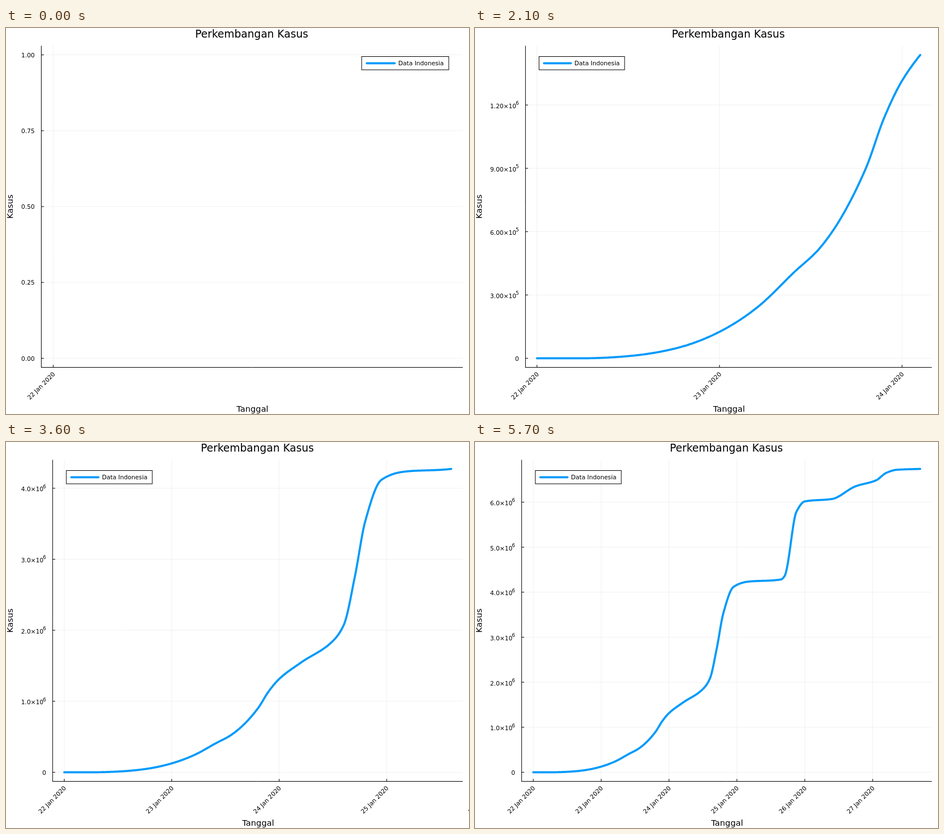
These frames come from a looping animation (820x683 px, 5800 ms). An HTML page with a canvas:

```html
<!DOCTYPE html>
<html lang="id">
<head>
<meta charset="utf-8">
<style>
html, body { margin: 0; width: 100%; height: 100%; overflow: hidden; background: #fff; }
canvas { display: block; }
</style>
</head>
<body>
<canvas id="stage" width="820" height="683"></canvas>
<script>
const ctx = document.getElementById('stage').getContext('2d');
const TOP = 31.5, BOTTOM = 600.5, RIGHT = 809, PAD = 0.03 / 1.06;
const STEP_DAYS = 20, FRAMES = 58, FRAME_MS = 100;
const TICK = 32 / 3, GUIDE = 44 / 3, TITLE = 56 / 3;
const BLUE = '#009afa', GRID = 'rgba(0,0,0,0.06)';

// Turning points of the curve: [day, cumulative cases in thousands].
const FIRST_DAY = 40;
const keys = [
  [FIRST_DAY, 0.002], [50, 0.034], [60, 0.514], [80, 3.842], [120, 20.16], [160, 56.39],
  [200, 125.4], [240, 236.5], [280, 400.5], [310, 522.6], [360, 896.6], [380, 1134.9],
  [400, 1314.6], [440, 1542.5], [500, 1850], [520, 2073], [540, 2726.8], [560, 3533],
  [590, 4117], [630, 4231], [730, 4283], [740, 4353], [775, 5780], [800, 6016],
  [880, 6070], [950, 6353], [1010, 6485], [1040, 6650], [1070, 6718], [1140, 6738.5]
];
// Growth is close to a power law, so the curve is smooth on log-log axes.
const logDay = d => Math.log(d - FIRST_DAY + 1);
const curve = monotoneCubic(keys.map(([d, k]) => [logDay(d), Math.log(k * 1000)]));
const daily = Array.from({ length: (FRAMES - 1) * STEP_DAYS + 1 },
  (_, d) => d < FIRST_DAY ? 0 : Math.exp(curve(logDay(d))));

function monotoneCubic(points) {
  const gap = i => points[i + 1][0] - points[i][0];
  const slope = i => (points[i + 1][1] - points[i][1]) / gap(i);
  const last = points.length - 1;
  const tangents = points.map((_, i) => {
    if (i === 0) return slope(0);
    if (i === last) return slope(last - 1);
    const g = gap(i - 1), h = gap(i);
    return 3 * (g + h) / ((2 * h + g) / slope(i - 1) + (h + 2 * g) / slope(i));
  });
  return x => {
    let i = 0;
    while (i < last - 1 && x >= points[i + 1][0]) i++;
    const h = gap(i), u = (x - points[i][0]) / h, w = 1 - u;
    return points[i][1] * w * w * (1 + 2 * u) + points[i + 1][1] * u * u * (3 - 2 * u)
      + h * u * w * (tangents[i] * w - tangents[i + 1] * u);
  };
}

// Picks the tick step with the best mix of count, coverage and roundness.
function yTicks(max) {
  const span = max * 1.06, power = Math.floor(Math.log10(max));
  let best = -1, ticks = [];
  for (const z of [power, power - 1]) {
    for (const [q, nice] of [[5, .9], [3, .2], [2.5, .5], [2, .7], [1, 1]]) {
      const step = q * 10 ** z, n = Math.floor(max * 1.03 / step) + 1;
      if (n < 4 || n >= 10) continue;
      const score = (1 - Math.abs(n - 5) / 5) / 4 + span / ((n - 1) * step) / 2 + nice / 4;
      if (score > best + 1e-9) {
        best = score;
        ticks = Array.from({ length: n }, (_, i) => +(i * step).toPrecision(6));
      }
    }
  }
  return ticks;
}

function yLabels(ticks) {
  const decimals = list => Math.max(...list.map(v => (String(+v.toFixed(6)).split('.')[1] || '').length));
  if (ticks[ticks.length - 1] <= 1e4) {
    const d = decimals(ticks);
    return ticks.map(v => ({ text: v.toFixed(d) }));
  }
  const exps = ticks.map(v => v ? Math.floor(Math.log10(v) + 1e-9) : 0);
  const mants = ticks.map((v, i) => v / 10 ** exps[i]);
  const d = decimals(mants) + 1;
  return mants.map((m, i) => m ? { text: m.toFixed(d) + '×10', exp: exps[i] } : { text: '0' });
}

function textWidth(str) {
  ctx.font = TICK + 'px "DejaVu Sans", sans-serif';
  return ctx.measureText(str).width;
}

function text(str, x, y, size, align = 'center', angle = 0) {
  ctx.font = size + 'px "DejaVu Sans", sans-serif';
  ctx.textAlign = align;
  ctx.fillStyle = '#000';
  ctx.save();
  ctx.translate(x, y);
  ctx.rotate(angle);
  ctx.fillText(str, 0, 0);
  ctx.restore();
}

function path(points, color = '#000', width = 1, cap = 'butt') {
  ctx.strokeStyle = color;
  ctx.lineWidth = width;
  ctx.lineCap = cap;
  ctx.lineJoin = 'round';
  ctx.beginPath();
  for (const [x, y] of points) ctx.lineTo(x, y);
  ctx.stroke();
}

function line(x1, y1, x2, y2, ...style) {
  path([[x1, y1], [x2, y2]], ...style);
}

function legend(left, onRight) {
  const w = RIGHT - left, label = 'Data Indonesia';
  const boxW = textWidth(label) + w * 0.0989;
  const x = onRight ? RIGHT - w / 30 - boxW : left + w / 30;
  ctx.fillStyle = '#fff';
  ctx.fillRect(x, 50.5, boxW, 23.5);
  ctx.strokeStyle = '#000';
  ctx.lineWidth = 1;
  ctx.lineJoin = 'miter';
  ctx.strokeRect(x, 50.5, boxW, 23.5);
  line(x + w * 0.0122, 62.3, x + w * 0.0783, 62.3, BLUE, 3.7, 'round');
  text(label, x + w * 0.087, 66.3, TICK, 'left');
}

function draw(frame) {
  const days = frame * STEP_DAYS, max = daily[days] || 1;
  const ticks = yTicks(max), labels = yLabels(ticks);
  const left = Math.max(...labels.map(l => 26.8 + textWidth(l.text) + (l.exp ? 16.4 : 12)));
  const w = RIGHT - left, h = BOTTOM - TOP, mid = (left + RIGHT) / 2;
  const px = d => left + w * (PAD + d / (days || 1) / 1.06);
  const py = v => BOTTOM - h * (PAD + v / max / 1.06);

  ctx.fillStyle = '#fff';
  ctx.fillRect(0, 0, 820, 683);

  for (let i = 0; i < 6; i++) {
    const x = px(i * 200);
    if (x <= RIGHT) line(x, TOP, x, BOTTOM, GRID);
    line(x, BOTTOM, x, BOTTOM - 4.5);
    text(`${22 + i} Jan 2020`, x + 3.9, 613.2, TICK, 'right', -Math.PI / 4);
  }
  ticks.forEach((v, i) => {
    const y = py(v), { text: label, exp } = labels[i];
    line(left, y, RIGHT, y, GRID);
    line(left, y, left + 4.5, y);
    if (exp) {
      text(label, left - 16.4, y + 5.5, TICK, 'right');
      text(exp, left - 11.7, y - 0.2, TICK * 0.8, 'right');
    } else {
      text(label, left - 11.7, y + 4.2, TICK, 'right');
    }
  });
  line(left, TOP, left, BOTTOM + 0.5);
  line(left - 0.5, BOTTOM, RIGHT, BOTTOM);

  if (days) path(daily.slice(0, days + 1).map((v, d) => [px(d), py(v)]), BLUE, 3.7, 'round');

  text('Perkembangan Kasus', mid - 0.7, 16.5, TITLE);
  text('Tanggal', mid + 0.7, 679, GUIDE);
  text('Kasus', 12, (TOP + BOTTOM) / 2, GUIDE, 'center', -Math.PI / 2);
  legend(left, frame < 2);
}

const start = performance.now();
function tick() {
  draw(Math.floor((performance.now() - start) / FRAME_MS) % FRAMES);
  requestAnimationFrame(tick);
}
tick();
</script>
</body>
</html>
```
